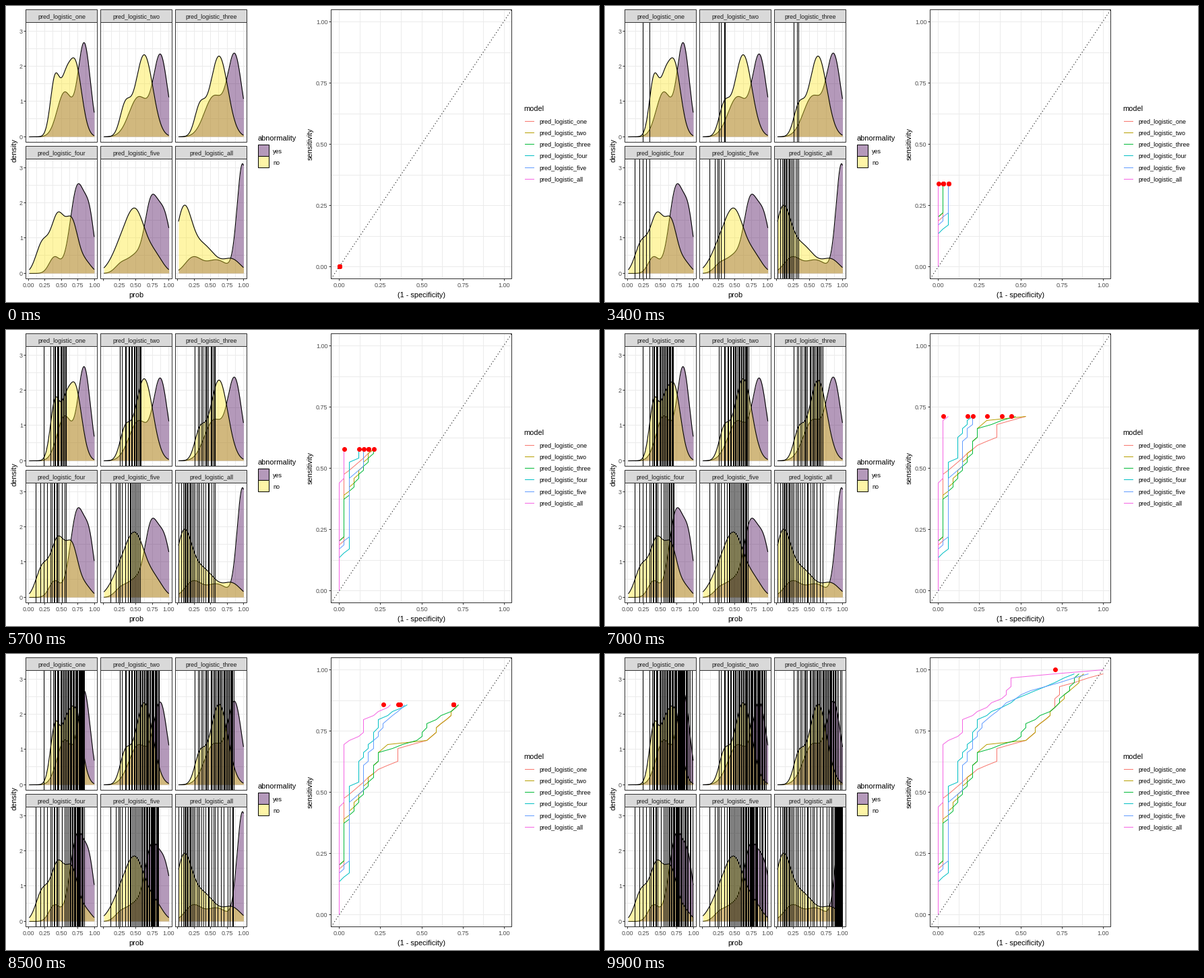
These frames come from a looping animation (880x440 px, 10 s). A matplotlib script:

```python
import matplotlib.pyplot as plt
import numpy as np
from matplotlib.animation import FuncAnimation
from matplotlib.collections import LineCollection
from matplotlib.patches import Rectangle

W, H, DPI = 880, 440, 100
FRAMES = 100
PX = 72 / DPI
N_YES, N_NO = 59, 34
N_CUTS = 46

plt.rcParams["font.family"] = "Liberation Sans"
MODELS = ["pred_logistic_" + s for s in ("one", "two", "three", "four", "five", "all")]
HUES = ["#F8766D", "#B79F00", "#00BA38", "#00BFC4", "#619CFF", "#F564E3"]
GRID, FRAME, LABEL = "#EBEBEB", "#333333", "#4D4D4D"
PURPLE, YELLOW = "#440154", "#FDE725"

# Densities as sums of bells: centre, width and height in pixels
YES = [
    [(87, 11, 66), (116, 9.1, 138)],
    [(86, 14, 59), (118.5, 10.4, 119)],
    [(87, 14, 60), (118, 10.5, 119)],
    [(72, 8, 24), (106.5, 11, 130), (124.5, 7.2, 64)],
    [(60, 9, 13), (81, 11, 25), (104.5, 9.5, 100), (124, 10, 83)],
    [(56, 12, 23), (91, 16, 20), (129.5, 8, 162)],
]
NO = [
    [(73, 7, 88), (87.5, 6.5, 49), (102, 10, 112)],
    [(66, 7.7, 43), (94.3, 12.8, 122)],
    [(66, 7.7, 41), (94.6, 13, 120)],
    [(54, 9.5, 44), (77, 10, 84), (98, 9, 72), (118, 9, 16)],
    [(65, 16, 50), (84, 13, 67), (110, 12, 25)],
    [(42, 11.5, 88), (70, 18, 42), (114, 13, 20)],
]
# ROC corners: (hits, false alarms)
CORNERS = [
    [(11, 0), (12, 1), (28, 1), (35, 8), (37, 12), (40, 12), (42, 18), (50, 24),
     (55, 25), (58, 34)],
    [(12, 0), (13, 1), (23, 1), (34, 7), (39, 8), (41, 10), (42, 18), (50, 24),
     (58, 30)],
    [(12, 0), (13, 1), (22, 1), (34, 7), (39, 8), (42, 16), (46, 18), (50, 24),
     (58, 29)],
    [(8, 0), (10, 2), (31, 2), (32, 4), (37, 4), (42, 7), (47, 8), (53, 18), (58, 28)],
    [(10, 0), (13, 2), (27, 2), (30, 5), (35, 5), (42, 7.4), (47, 10), (51, 14),
     (54, 19), (58, 31)],
    [(26, 0), (27, 1), (41, 1), (44, 5), (47, 5), (50, 10), (53, 14), (57, 15),
     (58, 24), (59, 34)],
]

fig = plt.figure(figsize=(W / DPI, H / DPI), dpi=DPI, facecolor="white")
ax = fig.add_axes([0, 0, 1, 1])
ax.set(xlim=(0, W), ylim=(H, 0))
ax.axis("off")


def snap(v):
    """Centre of the pixel that holds v."""
    return np.floor(v) + 0.5


def line(xs, ys, color="black", z=2, **kw):
    kw = {"lw": PX, "solid_capstyle": "butt", "snap": False, **kw}
    return ax.plot(xs, ys, color=color, zorder=z, **kw)[0]


def box(x0, y0, x1, y1, fill="none", edge=FRAME, z=6):
    ax.add_patch(Rectangle((x0, y0), x1 - x0, y1 - y0, fc=fill, ec=edge,
                           lw=PX, snap=False, zorder=z))


def text(x, y, s, size=9, color="black", **kw):
    kw = {"va": "baseline", **kw}
    ax.text(x, y, s, fontsize=size * PX, color=color, zorder=8, **kw)


# Density facets
X0, XU, Y0, YU = 33.3, 97.7, 194, 52.3
XS = np.linspace(34.5, 130.9, 400)


def bells(parts):
    return sum(h * np.exp(-((XS - c) / w) ** 2 / 2) for c, w, h in parts)


def draw_cuts(yes, no, rng):
    """Jittered quantiles of the pooled density."""
    cdf = np.cumsum(N_YES * yes + N_NO * no)
    u = (np.arange(N_CUTS) + rng.random(N_CUTS)) / N_CUTS
    return np.interp(u * cdf[-1], cdf, XS)


def facet(i):
    row, col = divmod(i, 3)
    left, top, dx = 29.5 + 111 * col, 24.5 + 203 * row, 110.75 * col
    right, bottom, base = left + 106, top + 178, Y0 + 203 * row
    for p in np.arange(0, 1.01, 0.125):
        x = snap(X0 + dx + XU * p)
        line([x, x], [top, bottom], GRID, 1)
    for d in np.arange(0, 3.1, 0.5):
        y = snap(base - YU * d)
        line([left, right], [y, y], GRID, 1)
    yes, no = bells(YES[i]), bells(NO[i])
    for z, h, fill in ((2, yes, PURPLE), (3, no, YELLOW)):
        ax.fill_between(XS + dx, base, base - h, color=fill, alpha=0.4, lw=0, zorder=z)
        line(XS + dx, base - h + 0.5, z=z + 0.1, lw=1.1 * PX)
    box(left, top, right, bottom)
    box(left, top - 19, right, top, "#D9D9D9")
    text((left + right) / 2, top - 5.5, MODELS[i], color="#1A1A1A", ha="center")
    if col == 0:
        for d in range(4):
            y = snap(base - YU * d)
            line([left - 3, left], [y, y], FRAME)
            text(25, y + 3.2, str(d), color=LABEL, ha="right")
    if row == 1:
        for p in np.arange(0, 1.01, 0.25):
            x = snap(X0 + dx + XU * p)
            line([x, x], [bottom, bottom + 3], FRAME)
            if p > 0 or col == 0:
                text(x, 418, f"{p:.2f}", color=LABEL, ha="center")
    cuts = draw_cuts(yes, no, np.random.default_rng(i + 3))
    segs = np.array([[(x, top), (x, bottom)] for x in snap(cuts + dx)])
    rules = LineCollection([], colors="black", linewidths=PX, snap=False, zorder=5)
    ax.add_collection(rules)
    return rules, segs, np.round((cuts - X0) / XU * (FRAMES - 1))


facets = [facet(i) for i in range(6)]
text(193, 433, "prob", 11, ha="center")
text(12, 214, "density", 11, ha="center", va="center", rotation=90)

text(374, 200, "abnormality", 11)
for y, fill, name in ((206.5, PURPLE, "yes"), (223.5, YELLOW, "no")):
    ax.add_patch(Rectangle((374.5, y), 16, 17, fc=fill, alpha=0.4, lw=0, zorder=2))
    box(374.5, y, 390.5, y + 17, edge="black")
    text(396, y + 12.5, name)


# ROC panel
def roc_x(v):
    return snap(494.6 + 245 * v)


def roc_y(v):
    return snap(387.5 - 364 * v)


LEFT, TOP, RIGHT, BOTTOM = 482.5, 5.5, 750.5, 405.5
for v in np.arange(0, 1.01, 0.125):
    x, y = roc_x(v), roc_y(v)
    line([x, x], [TOP, BOTTOM], GRID, 1)
    line([LEFT, RIGHT], [y, y], GRID, 1)
    if v % 0.25 == 0:
        line([x, x], [BOTTOM, BOTTOM + 3], FRAME)
        line([LEFT - 3, LEFT], [y, y], FRAME)
        text(x, 418, f"{v:.2f}", color=LABEL, ha="center")
        text(477.5, y + 3.2, f"{v:.2f}", color=LABEL, ha="right")
line([LEFT, RIGHT], [BOTTOM, TOP], lw=1.1 * PX, linestyle=(0, (1, 3)),
     dash_capstyle="butt")
box(LEFT, TOP, RIGHT, BOTTOM)
text(616.5, 433, "(1 - specificity)", 11, ha="center")
text(452, 205, "sensitivity", 11, ha="center", va="center", rotation=90)

text(768, 156, "model", 11)
for i, name in enumerate(MODELS):
    y = snap(171 + 17.3 * i)
    line([770, 784], [y, y], HUES[i])
    text(791, y + 3.5, name)

HITS = np.arange(N_YES + 1)
HIT_FRAMES = np.round(HITS / N_YES * (FRAMES - 1))

ends = [np.floor(np.interp(HITS, *zip(*c)) + 0.5) for c in CORNERS]
starts = [np.append(0, e[:-1]) for e in ends]
lasts = [c[-1][0] for c in CORNERS]
paths = [line([], [], c, 3 + 0.1 * i) for i, c in enumerate(HUES)]
dots = line([], [], "red", 5, ls="none", marker="o", ms=7 * PX, mew=0)


def update(f):
    for rules, segs, when in facets:
        rules.set_segments(segs[when <= f])
    hit = np.interp(f, HIT_FRAMES, HITS)
    heads = []
    for path, start, end, last in zip(paths, starts, ends, lasts):
        h = min(hit, last)
        done = HITS[HITS <= h]
        xs = np.append(end[done], np.interp(h, HITS, end))
        path.set_data(roc_x(xs / N_NO), roc_y(np.append(done, h) / N_YES))
        if hit <= last:
            heads.append(np.interp(h, HITS, start) / N_NO)
    dots.set_data(roc_x(np.array(heads)), np.full(len(heads), roc_y(hit / N_YES)))
    return []


anim = FuncAnimation(fig, update, frames=FRAMES, interval=100, repeat=True,
                     repeat_delay=0, blit=False)
plt.show()
```
